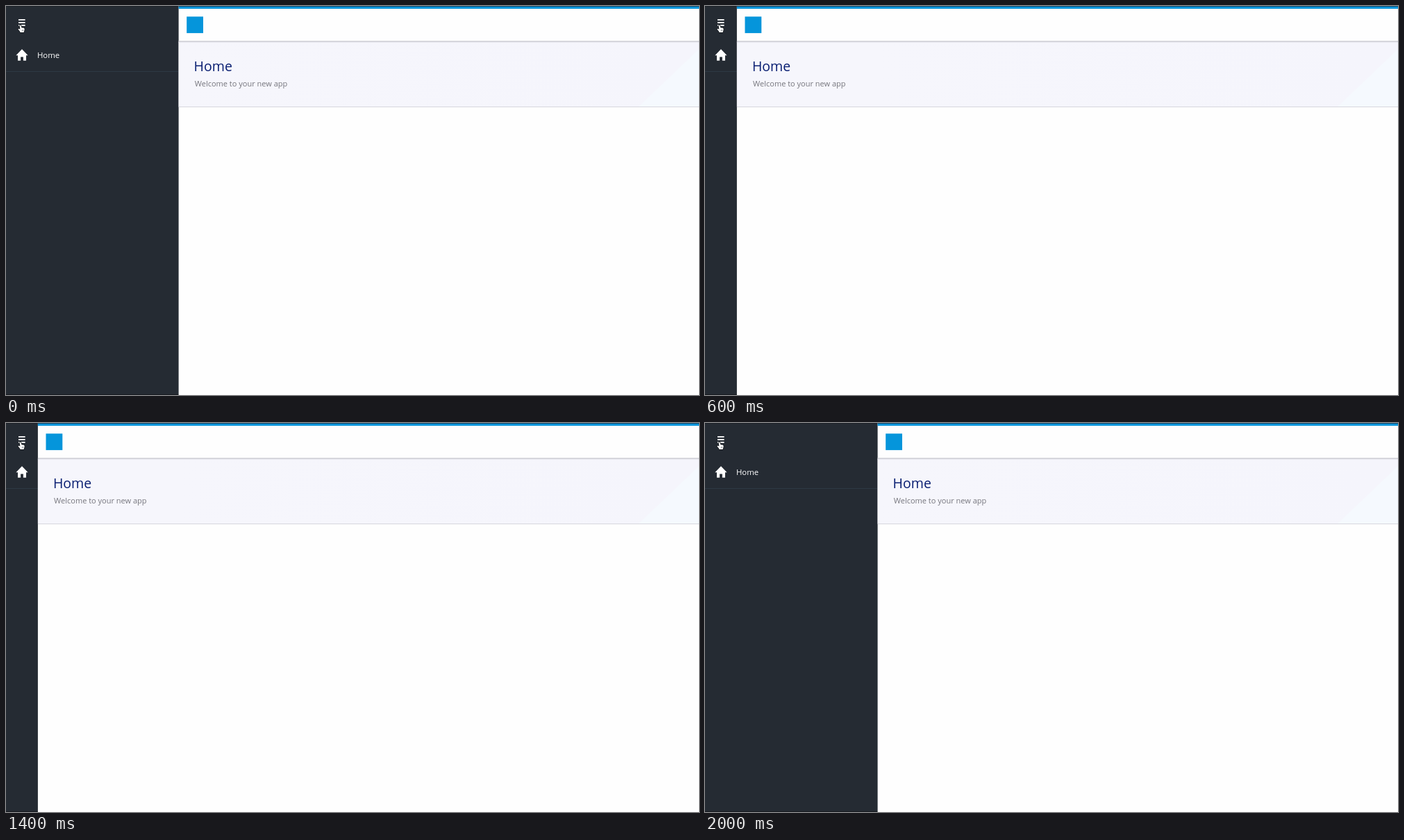
These frames come from a looping animation (998 by 561 pixels, 2200 ms). An HTML page with a canvas:

```html
<!DOCTYPE html>
<html lang="en">
<head>
<meta charset="utf-8">
<title>Collapsing sidebar</title>
<style>
  html, body { margin: 0; width: 100%; height: 100%; overflow: hidden; background: #fefefe; }
  canvas { display: block; width: 998px; height: 561px; }
</style>
</head>
<body>
<canvas id="stage" width="998" height="561"></canvas>
<script>
const W = 998, H = 561;
const STEP = 200;
const OPEN = 248.6, CLOSED = 45.9;
// Sidebar width for each step of the loop.
const WIDTHS = [OPEN, 242.4, 67.8, CLOSED, CLOSED, CLOSED, CLOSED, CLOSED, 108.3, 191.7, OPEN];
const LOOP = STEP * WIDTHS.length;

const ctx = document.getElementById('stage').getContext('2d');

function rect(x, y, w, h, color) {
  ctx.fillStyle = color;
  ctx.fillRect(x, y, w, h);
}

function text(str, x, y, size, color) {
  ctx.font = `${size}px "Open Sans", sans-serif`;
  ctx.fillStyle = color;
  ctx.fillText(str, x, y);
}

function heroGradient() {
  const g = ctx.createLinearGradient(249, 146, 960, 98);
  g.addColorStop(0, '#f6f6fc');
  g.addColorStop(1, '#f5f5fc');
  return g;
}

function drawHome() {
  ctx.fillStyle = '#fff';
  ctx.fill(new Path2D('M23 62.3 L31.6 71.3 H29 V78.8 H24.9 V73.4 H21.1 V78.8 H17 V71.3 H14.4 Z'));
}

function drawPointer() {
  const hand = new Path2D(
    'M19.6 28.2 Q20.6 27 21.6 28.2 L22.6 31.4 L25.2 31.6 Q26.8 32 26.7 33.8 ' +
    'L26.2 36 L25.6 38 H20.6 L19.9 36.4 L17.6 33.8 Q17.4 32.6 18.7 32.8 L20.4 33.8 Z');
  ctx.lineWidth = 1.6;
  ctx.strokeStyle = '#14181c';
  ctx.stroke(hand);
  ctx.fillStyle = '#fff';
  ctx.fill(hand);
  for (const x of [22.9, 24.6]) rect(x, 34, 0.6, 2.4, '#555b62');
}

function drawSidebar() {
  rect(0, 0, W, H, '#252b33');
  rect(0, 94, OPEN, 1, '#2e3a44');
  rect(0, 0, W, 1, '#1c2127');
  rect(0, H - 1, W, 1, '#161a1f');
  for (const y of [19, 23, 27]) rect(18, y, 9.6, 1.8, '#fff');
  drawHome();
  text('Home', 44.9, 75, 11.4, '#fff');
  drawPointer();
}

function drawContent(x) {
  const w = W - x;
  rect(x, 0, w, H, '#fefefe');
  rect(x, 0, w, 1, '#1d4560');
  rect(x, 1, w, 3, '#0595db');

  rect(x, 52, w, 93, heroGradient());
  ctx.fillStyle = '#f5f9fe';
  ctx.fill(new Path2D('M911 145 L998 62 V145 Z'));
  rect(x, 50, w, 1, '#dcdce0');
  rect(x, 51, w, 1, '#d2d2da');
  rect(x, 52, w, 1, '#ececf3');
  rect(x, 145, w, 1, '#d7d7de');

  rect(x + 11.6, 15.3, 23.8, 23.8, '#0595db');
  text('Home', x + 22, 94.3, 19.5, '#0a1f72');
  text('Welcome to your new app', x + 23.2, 116, 11, '#75757c');
}

function frame() {
  const step = Math.floor((performance.now() % LOOP) / STEP);
  drawSidebar();
  drawContent(WIDTHS[step]);
  requestAnimationFrame(frame);
}
frame();
</script>
</body>
</html>
```
